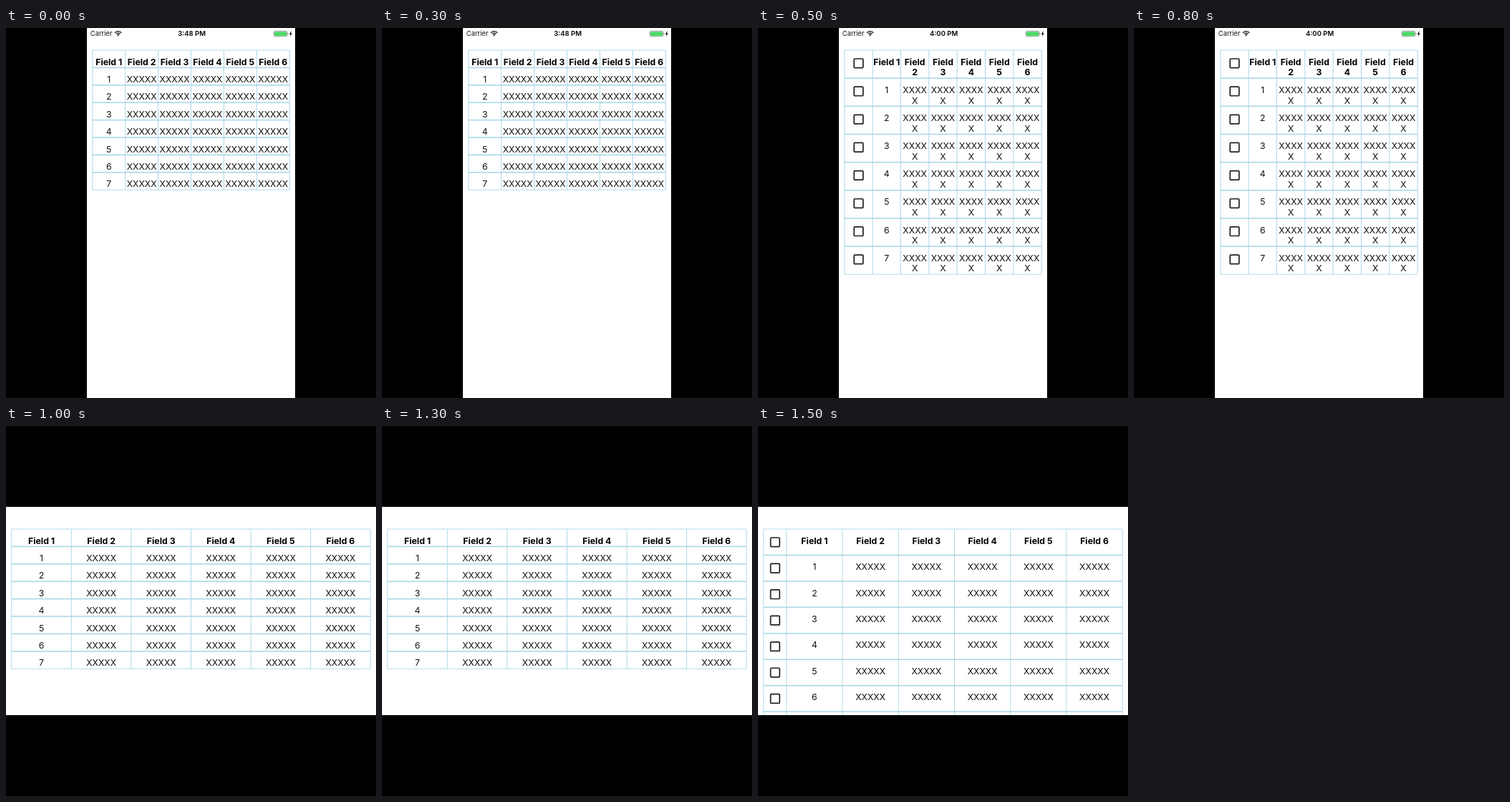
An HTML page with a canvas that plays this animation: 517x517 px, repeating every 2 s.

```html
<!DOCTYPE html>
<html lang="en">
<head>
<meta charset="utf-8">
<style>
  html, body { margin: 0; width: 100%; height: 100%; overflow: hidden; background: #000; }
  canvas { display: block; }
</style>
</head>
<body>
<canvas width="517" height="517"></canvas>
<script>
const ctx = document.querySelector('canvas').getContext('2d');
const LINE = '#add8e6', INK = '#111';

// One entry per half second: device orientation and table layout
const scenes = [
  { clock: '3:48 PM', x: 120.8, y: 31, width: 275.4, row: 24.4 },
  { clock: '4:00 PM', x: 120.8, y: 31, width: 275.4, row: 39.15, check: 39.3, wrap: true },
  { x: 7.8, y: 144, width: 501.4, row: 24.4 },
  { x: 7.8, y: 144, width: 501.4, row: 36.45, check: 32 }
];

function text(str, x, y, size = 12.3, weight = 400, align = 'center') {
  ctx.font = `${weight} ${size}px Inter, sans-serif`;
  ctx.textAlign = align;
  ctx.fillStyle = weight > 400 ? '#000' : INK;
  ctx.fillText(str, x, y);
}

function roundBox(x, y, w, h, r) {
  ctx.beginPath();
  ctx.roundRect(x, y, w, h, r);
}

function statusBar(clock) {
  text('Carrier', 117.8, 11.2, 9.4, 400, 'left');
  text(clock, 259.6, 11.2, 9.5, 600);

  // Wi-Fi
  ctx.strokeStyle = ctx.fillStyle = INK;
  ctx.lineWidth = 1.3;
  for (const r of [3.8, 6.3]) {
    ctx.beginPath();
    ctx.arc(156.7, 10.9, r, -Math.PI * 0.77, -Math.PI * 0.23);
    ctx.stroke();
  }
  ctx.beginPath();
  ctx.moveTo(156.7, 11.2);
  ctx.arc(156.7, 10.9, 2.2, -Math.PI * 0.77, -Math.PI * 0.23);
  ctx.fill();

  // Battery and charging bolt
  ctx.strokeStyle = '#777';
  ctx.lineWidth = 0.7;
  roundBox(374.4, 4.4, 18.4, 7.4, 1.5);
  ctx.stroke();
  ctx.fillStyle = '#4cd964';
  roundBox(375.2, 5.2, 16.8, 5.8, 0.8);
  ctx.fill();
  ctx.fillStyle = '#777';
  ctx.fillRect(393.4, 6.8, 1, 2.6);
  ctx.fillStyle = INK;
  ctx.fill(new Path2D('M398.8 4 L395.6 8.4 H397.6 L396.8 12 L400 7.4 H398 Z'));
}

function table({ x, y, width, row, check = 0, wrap }) {
  const col = (width - check) / 6;
  const right = x + width, bottom = y + row * 8;

  ctx.fillStyle = LINE;
  for (let r = 0; r <= 8; r++) {
    const h = r % 8 ? 1.6 : 0.9;
    ctx.fillRect(x, y + r * row - h / 2, right - x, h);
  }
  const edges = Array.from({ length: 7 }, (_, c) => x + check + c * col);
  if (check) edges.unshift(x);
  for (const edge of edges) ctx.fillRect(edge - 0.5, y, 1, bottom - y);

  for (let r = 0; r < 8; r++) {
    const top = y + r * row, base = top + 20.6;
    for (let c = 0; c < 6; c++) {
      const cx = x + check + (c + 0.5) * col;
      const weight = r ? 400 : 700;
      const split = wrap && c > 0;
      const label = r ? (c ? 'XXXXX' : String(r)) : `Field ${c + 1}`;
      const cut = r ? 4 : 5;
      text(split ? label.slice(0, cut).trim() : label, cx, base, 12.3, weight);
      if (split) text(label.slice(cut).trim(), cx, base + 14.8, 12.3, weight);
    }
    if (check) {
      ctx.strokeStyle = '#222';
      ctx.lineWidth = 1.7;
      roundBox(x + check / 2 - 6.2, top + 12, 12.6, 12.6, 1);
      ctx.stroke();
    }
  }
}

function draw(scene) {
  ctx.fillStyle = '#000';
  ctx.fillRect(0, 0, 517, 517);
  ctx.save();
  ctx.beginPath();
  if (scene.clock) ctx.rect(113, 0, 291, 517);
  else ctx.rect(0, 113, 517, 291);
  ctx.clip();
  ctx.fillStyle = '#fff';
  ctx.fillRect(0, 0, 517, 517);
  if (scene.clock) statusBar(scene.clock);
  table(scene);
  ctx.restore();
}

function tick() {
  draw(scenes[Math.floor(performance.now() % 2000 / 500)]);
  requestAnimationFrame(tick);
}
tick();
</script>
</body>
</html>
```
